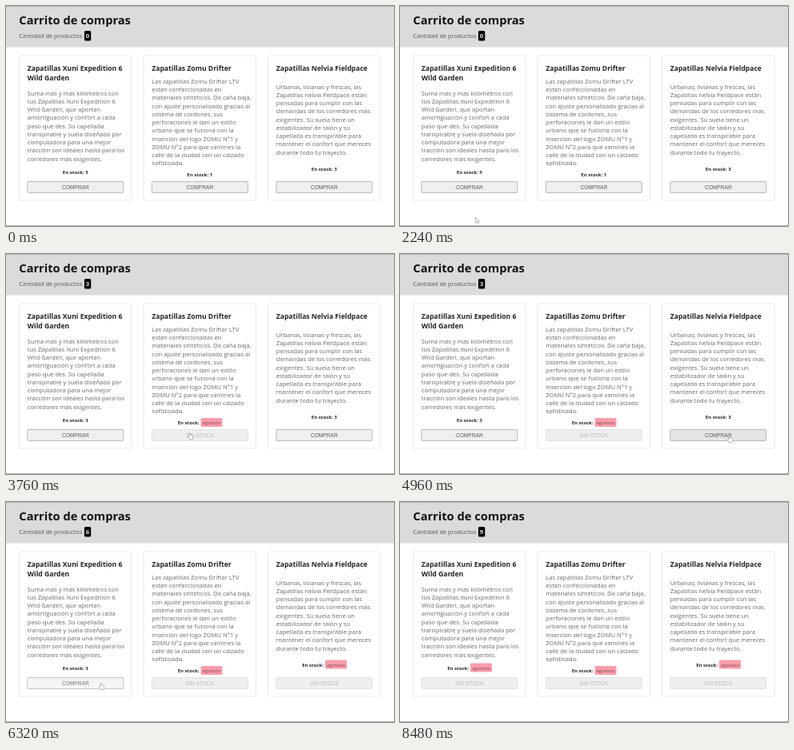
Recreate the animation shown at these times as an HTML page. Size 485 by 275 pixels, loop 8.56 s.

```html
<!DOCTYPE html>
<html lang="es">
<head>
<meta charset="utf-8">
<title>Carrito de compras</title>
<style>
html, body { margin: 0; width: 100%; height: 100%; overflow: hidden; background: #fff; }
svg { display: block; width: 485px; height: 275px; font-family: "Open Sans", "Noto Sans", sans-serif; }
.title { font-size: 14.65px; font-weight: 700; fill: #141414; }
.sub { font-size: 7.45px; fill: #555; }
.name { font-size: 8.59px; font-weight: 700; fill: #242424; }
.body { font-size: 7.6px; fill: #686868; }
.stock { font-size: 6.06px; font-weight: 700; fill: #262626; text-anchor: middle; }
.out { font-size: 6.06px; fill: #8a4a54; text-anchor: middle; }
.label { font: 6.62px "Liberation Sans", Arial, sans-serif; text-anchor: middle; }
.count { font-size: 7.8px; font-weight: 700; fill: #e6e6e6; text-anchor: middle; }
</style>
</head>
<body>
<svg id="stage" viewBox="0 0 485 275"></svg>
<script>
const LOOP = 8560, STEP = 80;
const stage = document.getElementById("stage");

// hold: how long the button looks pressed before each click
const products = [
  { x: 16.5, stock: 5, textY: 111.6, stockY: 209.6, hold: 80, clicks: [2880, 3120, 6400, 6560, 6720],
    name: ["Zapatillas Xuni Expedition 6", "Wild Garden"],
    body: ["Suma más y más kilómetros con", "tus Zapatillas Xuni Expedition 6",
      "Wild Garden, que aportan", "amortiguación y confort a cada", "paso que des. Su capellada",
      "transpirable y suela diseñada por", "computadora para una mejor",
      "tracción son ideales hasta para los", "corredores más exigentes."] },
  { x: 172, stock: 1, textY: 96.8, stockY: 213, hold: 0, clicks: [3680],
    name: ["Zapatillas Zomu Drifter"],
    body: ["Las zapatillas Zomu Drifter LTV", "están confeccionadas en",
      "materiales sintéticos. De caña baja,", "con ajuste personalizado gracias al",
      "sistema de cordones, sus", "perforaciones le dan un estilo", "urbano que se fusiona con la",
      "inserción del logo ZOMU N°1 y", "ZOMU N°2 para que camines la",
      "calle de la ciudad con un calzado", "sofisticado."] },
  { x: 327.5, stock: 3, textY: 103.6, stockY: 205.6, hold: 0, clicks: [5040, 5200, 5440],
    name: ["Zapatillas Nelvia Fieldpace"],
    body: ["Urbanas, livianas y frescas, las", "Zapatillas nelvia Fieldpace están",
      "pensadas para cumplir con las", "demandas de los corredores más", "exigentes. Su suela tiene un",
      "estabilizador de talón y su", "capellada es transpirable para", "mantener el confort que mereces",
      "durante todo tu trayecto."] }
];

// Pointer tip: time, x, y
const path = [
  [1920, 97, 276], [2240, 94.5, 264], [2400, 95, 262], [2800, 114, 229], [2960, 115, 228],
  [3280, 115, 228], [3600, 229, 224], [3840, 230, 223], [4240, 400, 230], [4640, 412, 228],
  [4960, 411.5, 227], [5520, 411.5, 227], [6160, 120, 227], [6320, 118.5, 226],
  [7360, 118.5, 226], [8080, 96, 277]
];

function add(parent, tag, attrs, text) {
  const el = document.createElementNS("http://www.w3.org/2000/svg", tag);
  for (const k in attrs) el.setAttribute(k, attrs[k]);
  if (text !== undefined) el.textContent = text;
  parent.appendChild(el);
  return el;
}
const rect = (p, x, y, width, height, fill, more) => add(p, "rect", { x, y, width, height, fill, ...more });
const write = (p, cls, x, y, text) => add(p, "text", { class: cls, x, y }, text);
const show = (el, on) => el.setAttribute("visibility", on ? "visible" : "hidden");

rect(stage, 0, 0, 485, 51.5, "#dbdbdb");
rect(stage, 0, 0, 485, 1, "#b4b4b4");
rect(stage, 0, 274, 485, 1, "#b5adaf");
write(stage, "title", 16.3, 23, "Carrito de compras");
write(stage, "sub", 16.3, 40.3, "Cantidad de productos");
rect(stage, 97.9, 31, 8.3, 12.5, "#000", { rx: 1.6 });
const count = write(stage, "count", 102, 40.2, "0");

for (const p of products) {
  const left = p.x + 10.3, mid = p.x + 70.3;
  rect(stage, p.x, 62, 140.5, 181, "#fff", { rx: 2.5, stroke: "#e2e2e2", "stroke-width": .8 });
  p.name.forEach((line, i) => write(stage, "name", left, 81.2 + i * 12, line));
  p.body.forEach((line, i) => write(stage, "body", left, p.textY + i * 10.25, line));
  p.stockText = write(stage, "stock", mid, p.stockY, "");
  p.badge = add(stage, "g", {});
  rect(p.badge, mid + 1.2, p.stockY - 8, 27, 11, "#f89dab", { rx: 1.5 });
  write(p.badge, "out", mid + 14.7, p.stockY, "agotado");
  p.button = rect(stage, left, 219.5, 120, 14, "#efefef", { rx: 1, "stroke-width": .7 });
  p.label = write(stage, "label", mid, 228.8, "");
}

const shape = { fill: "#fff", stroke: "#888", "stroke-width": .6, "stroke-linejoin": "round" };
const arrow = add(stage, "path", { ...shape, d: "M0 0V7.2L1.7 5.7L2.8 8.1L3.9 7.6L2.8 5.3H5Z" });
const hand = add(stage, "path", { ...shape,
  d: "M-.7 .6Q0-.5 .7 .6V3Q1.5 2.5 2 3.2Q2.8 2.8 3.2 3.6Q4.2 3.4 4.2 4.4V6L3.3 8.6H-.3L-2.3 5.4Q-2.3 4.3-.7 5.3Z" });

function pointerAt(t) {
  const i = path.findIndex(k => k[0] > t);
  if (i < 1) return null;
  const [a, b] = [path[i - 1], path[i]];
  const u = (t - a[0]) / (b[0] - a[0]), e = u * u * (3 - 2 * u);
  return [a[1] + (b[1] - a[1]) * e, a[2] + (b[2] - a[2]) * e];
}

// Fill, border and label colours of a button
function buttonStyle(none, pressed, over) {
  if (none) return ["#efefef", "#dadada", "#bababa"];
  if (pressed) return ["#f5f5f5", "#b0b0b0", "#777"];
  return [over ? "#e5e5e5" : "#efefef", "#a0a0a0", "#5c5c5c"];
}

function draw(t) {
  const tip = pointerAt(t);
  let total = 0, onButton = false;
  for (const p of products) {
    const sold = p.clicks.filter(c => c <= t).length;
    const left = p.x + 10.3, mid = p.x + 70.3, none = sold === p.stock;
    const over = !!tip && tip[0] > left && tip[0] < left + 120 && tip[1] > 219 && tip[1] < 234;
    const pressed = p.clicks.some(c => t < c && t >= c - p.hold);
    const [fill, border, ink] = buttonStyle(none, pressed, over);
    total += sold;
    onButton = onButton || over;
    p.stockText.textContent = none ? "En stock:" : "En stock: " + (p.stock - sold);
    p.stockText.setAttribute("x", none ? mid - 14.2 : mid);
    show(p.badge, none);
    p.button.setAttribute("fill", fill);
    p.button.setAttribute("stroke", border);
    p.label.textContent = none ? "SIN STOCK" : "COMPRAR";
    p.label.setAttribute("fill", ink);
  }
  count.textContent = total;
  show(arrow, tip && !onButton);
  show(hand, tip && onButton);
  if (tip) for (const el of [arrow, hand]) el.setAttribute("transform", `translate(${tip})`);
}

function tick() {
  const t = performance.now() % LOOP;
  draw(Math.floor(t / STEP) * STEP);
  requestAnimationFrame(tick);
}
tick();
</script>
</body>
</html>
```
